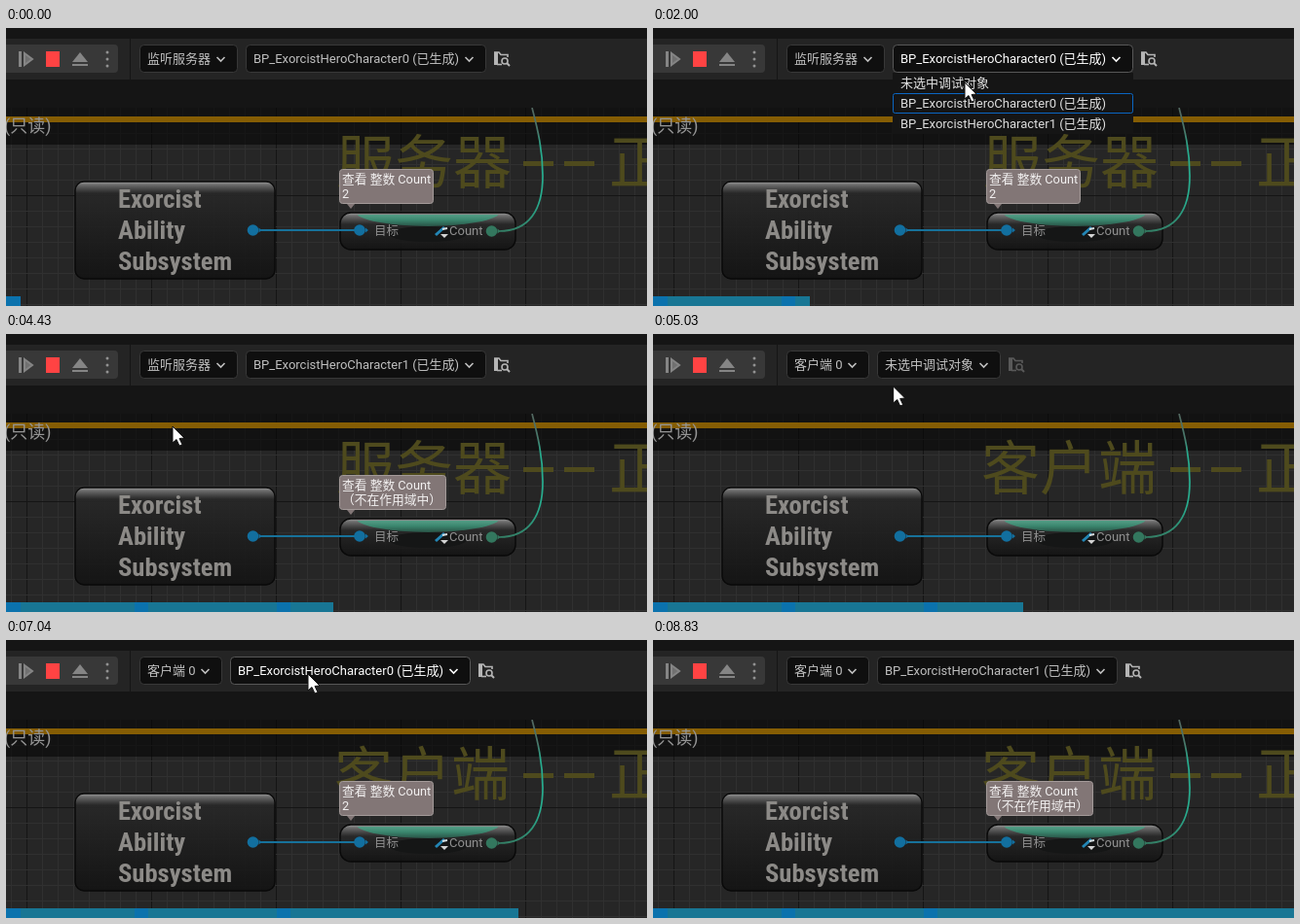
An HTML page with a canvas for the animation above (9.03 s loop, 658 by 286 pixels).

```html
<!DOCTYPE html>
<html lang="zh-CN">
<head>
<meta charset="utf-8">
<title>Blueprint debug target</title>
<style>
html, body { margin: 0; width: 100%; height: 100%; overflow: hidden; background: #151515; }
canvas { display: block; }
</style>
</head>
<body>
<canvas id="stage" width="658" height="286"></canvas>
<script>
const W = 658, H = 286, LOOP = 9030, STEPS = 45;
const ctx = document.getElementById('stage').getContext('2d');
const SANS = 'Roboto, "Noto Sans CJK SC", "Noto Sans CJK", sans-serif';
const CJK = '"Noto Sans CJK SC", "Noto Sans CJK", sans-serif';
const UI = '13px ' + SANS;

const NONE = '未选中调试对象';
const HERO = n => `BP_ExorcistHeroCharacter${n} (已生成)`;
const TARGETS = [NONE, HERO(0), HERO(1)];
const WORLDS = ['所有世界', '监听服务器', '客户端 0'];

// Cursor path: step, x, y of the tip
const PATH = [
  [2, 576, 150], [5, 400, 34], [7, 372, 34], [10, 320, 56], [11, 322, 96], [13, 318, 98],
  [17, 232, 40], [18, 222, 31], [19, 220, 34], [21, 170, 96], [23, 172, 94],
  [26, 284, 34], [28, 288, 36], [30, 291, 73], [32, 296, 78], [34, 310, 36],
  [36, 310, 34], [38, 312, 96], [40, 316, 98], [42, 520, 290]
];

function rect(x, y, w, h, color) {
  ctx.fillStyle = color;
  ctx.fillRect(x, y, w, h);
}

function box(x, y, w, h, r, fill, stroke, line = 1) {
  ctx.beginPath();
  ctx.roundRect(x, y, w, h, r);
  if (fill) { ctx.fillStyle = fill; ctx.fill(); }
  if (stroke) { ctx.strokeStyle = stroke; ctx.lineWidth = line; ctx.stroke(); }
}

function poly(points, fill, stroke, line = 1, close = true) {
  ctx.beginPath();
  points.forEach(([x, y]) => ctx.lineTo(x, y));
  if (close) ctx.closePath();
  if (fill) { ctx.fillStyle = fill; ctx.fill(); }
  if (stroke) { ctx.strokeStyle = stroke; ctx.lineWidth = line; ctx.stroke(); }
}

function dot(x, y, r, color) {
  ctx.beginPath();
  ctx.arc(x, y, r, 0, Math.PI * 2);
  ctx.fillStyle = color;
  ctx.fill();
}

function label(text, x, y, color, font = UI) {
  ctx.font = font;
  ctx.fillStyle = color;
  ctx.fillText(text, x, y);
}

function textWidth(text) {
  ctx.font = UI;
  return ctx.measureText(text).width;
}

function vertical(y0, y1, ...stops) {
  const g = ctx.createLinearGradient(0, y0, 0, y1);
  stops.forEach(([at, color]) => g.addColorStop(at, color));
  return g;
}

function stepAt(t) {
  return Math.min(STEPS - 1, Math.floor((t < 3400 ? t : t - 30) / 200));
}

function stateAt(i) {
  const client = i >= 23;
  const target = i < 12 ? 1 : i < 23 ? 2 : i < 31 ? 0 : i < 40 ? 1 : 2;
  let menu = null;
  if (i >= 7 && i <= 11) menu = { kind: 'target', hover: i === 11 ? 2 : -1 };
  if (i >= 19 && i <= 21) menu = { kind: 'world', hover: i - 19 };
  if (i >= 28 && i <= 30) menu = { kind: 'target', hover: i === 30 ? 1 : i === 29 ? 0 : -1 };
  if (i >= 36 && i <= 39) menu = { kind: 'target', hover: i > 37 ? 2 : i === 37 ? 1 : -1 };
  return { client, target, menu, cursor: cursorAt(i) };
}

function cursorAt(i) {
  const next = PATH.findIndex(k => k[0] > i);
  if (next < 1) return null;
  const [a, x0, y0] = PATH[next - 1], [b, x1, y1] = PATH[next];
  const u = (i - a) / (b - a);
  return [x0 + (x1 - x0) * u, y0 + (y1 - y0) * u];
}

function grid() {
  rect(0, 82, W, H - 82, '#262626');
  for (let x = 5; x < W; x += 16) rect(x, 82, 1, H, (x - 21) % 128 ? '#303030' : '#151515');
  for (let y = 92; y < H; y += 16) rect(0, y, W, 1, (y - 172) % 128 ? '#303030' : '#151515');
}

function watermark(client) {
  const color = '#4e4a1d', font = '500 60px ' + CJK;
  label(client ? '客户端' : '服务器', client ? 337 : 339, 160, color, font);
  rect(531, 137, 31, 5, color);
  rect(573, 137, 31, 5, color);
  label('正', 619, 160, color, font);
}

function header() {
  rect(0, 82, W, 38, 'rgba(8,8,8,.62)');
  rect(0, 91, W, 6, '#855d04');
  label('(只读)', -2, 107, '#959595', '18px ' + SANS);
}

function wires() {
  ctx.lineWidth = 2;
  ctx.strokeStyle = '#17729b';
  ctx.beginPath();
  ctx.moveTo(260, 208);
  ctx.lineTo(362, 208);
  ctx.stroke();
  ctx.strokeStyle = vertical(82, 210, [0, '#52665f'], [.2, '#48796b'], [.32, '#27ac8e'], [.75, '#27ac8e'], [1, '#347e65']);
  ctx.lineWidth = 1.7;
  ctx.beginPath();
  ctx.moveTo(506, 209);
  ctx.bezierCurveTo(537, 209, 551, 187, 551, 152);
  ctx.bezierCurveTo(551, 126, 546, 105, 540, 82);
  ctx.stroke();
}

function pin(x, y, color) {
  dot(x, y, 5.8, color);
  poly([[x + 6, y - 2.5], [x + 9, y], [x + 6, y + 2.5]], color);
}

function nodeBody(x, y, w, h, r) {
  const shine = 12 / h;
  const fill = vertical(y, y + h, [0, '#9a9a9a'], [shine * .3, '#696969'], [shine, 'rgba(40,40,40,.9)'], [1, 'rgba(18,18,18,.88)']);
  box(x, y, w, h, r, fill, '#090909', 1.4);
}

function getterNode() {
  nodeBody(71, 158, 205, 100, 9);
  const font = '700 26.6px "Roboto Condensed", ' + SANS;
  ctx.fontStretch = 'condensed';
  ['Exorcist', 'Ability', 'Subsystem'].forEach((word, n) => label(word, 115, 185 + n * 32, '#8c8a87', font));
  ctx.fontStretch = 'normal';
}

function countNode() {
  nodeBody(343, 190, 180, 38, 11);
  ctx.save();
  ctx.beginPath();
  ctx.roundRect(344, 192, 178, 35, 10);
  ctx.clip();
  ctx.beginPath();
  ctx.ellipse(433, 189, 74, 15, 0, 0, Math.PI * 2);
  ctx.fillStyle = vertical(191, 204, [0, '#59a38b'], [.5, '#3b866e'], [1, '#285446']);
  ctx.fill();
  ctx.beginPath();
  ctx.ellipse(433, 212, 40, 8, 0, 0, Math.PI * 2);
  ctx.fillStyle = '#151616';
  ctx.fill();
  ctx.restore();
  label('目标', 378, 213, '#909090', '12.5px ' + SANS);
  label('Count', 455, 213, '#909090');
  poly([[441, 213], [450, 205]], null, '#2386b5', 3, false);
  poly([[448, 207], [453, 206]], null, '#d6dfe2', 2, false);
  poly([[446, 212], [454, 212], [450, 216]], '#d4d4d4');
}

function bubble(target) {
  if (!target) return;
  const width = target === 1 ? 97 : 110, font = '12.75px ' + SANS;
  box(342.5, 145.5, width - 1, 35, 3, '#827676', '#a39a99');
  poly([[350, 181], [358, 181], [354, 186]], '#827676');
  label('查看 整数 Count', 345, 160, '#f2f0f0', font);
  label(target === 1 ? '2' : '（不在作用域中）', 345, 175, '#f2f0f0', font);
}

function toolbar() {
  rect(0, 0, W, 82, '#151515');
  rect(0, 11, W, 42, '#242424');
  box(-8, 17, 123, 29, 4, '#383838');
  rect(127, 11, 1, 42, '#151515');
  rect(13, 24, 3, 16, '#858585');
  poly([[19, 26], [27, 32], [19, 38]], '#707070', '#858585', 2);
  rect(41, 24, 14, 16, '#ff4343');
  poly([[68, 35], [76, 25], [84, 35]], '#858585');
  rect(68, 37, 16, 2, '#858585');
  [25, 32, 39].forEach(y => dot(104, y, 1.5, '#929292'));
}

function comboWidth(text) {
  return Math.floor(textWidth(text) + 36);
}

function combo(text, x, active) {
  const w = comboWidth(text);
  const color = active ? '#fff' : '#c0c0c0';
  box(x + .5, 17.5, w - 1, 28, 4, '#0f0f0f', active ? '#575757' : '#383838');
  label(text, x + 8, 36, color);
  const c = x + w - 17.5;
  poly([[c - 4, 30], [c, 34], [c + 4, 30]], null, color, 1.6, false);
}

function browseIcon(x, color) {
  poly([[x, 25], [x + 5, 25], [x + 7, 27.5], [x + 14, 27.5], [x + 14, 30]], null, color, 1.6, false);
  poly([[x, 25], [x + 4, 25], [x + 4, 38], [x, 38]], color);
  poly([[x + 3, 37.5], [x + 8, 37.5]], null, color, 1.6, false);
  ctx.beginPath();
  ctx.arc(x + 11, 34, 3, 0, Math.PI * 2);
  ctx.stroke();
  poly([[x + 13, 36], [x + 16, 39]], null, color, 2, false);
}

function dropdown(items, x, buttonWidth, selected, hover) {
  const w = Math.max(buttonWidth, Math.floor(Math.max(...items.map(textWidth)) + 16));
  rect(x, 46, w, items.length * 21, '#151515');
  items.forEach((item, n) => {
    const y = 46 + n * 21;
    if (n === hover) rect(x, y, w, 21, '#0070e0');
    else if (n === selected) box(x + .5, y + .5, w - 1, 20, 2, null, '#0a66c2');
    label(item, x + 8, y + 15, n === hover ? '#fff' : '#dedede');
  });
}

function controls({ client, target, menu, cursor }) {
  const over = (x, w) => cursor && cursor[1] >= 17 && cursor[1] < 46 && cursor[0] >= x && cursor[0] < x + w;
  const justOpened = kind => menu && menu.kind === kind && menu.hover < 0;
  const world = WORLDS[client ? 2 : 1], name = TARGETS[target];
  const worldWidth = comboWidth(world), targetWidth = comboWidth(name);
  const targetX = 137 + worldWidth + 8;
  combo(world, 137, justOpened('world') || over(137, worldWidth));
  combo(name, targetX, justOpened('target') || over(targetX, targetWidth));
  browseIcon(targetX + targetWidth + 8, target ? '#b5b5b5' : '#595959');
  if (!menu) return;
  if (menu.kind === 'world') dropdown(WORLDS, 137, worldWidth, 1, menu.hover);
  else dropdown(TARGETS, targetX, targetWidth, target, menu.hover);
}

function progress(i) {
  const edge = n => Math.round(W * n / STEPS);
  rect(0, 276, edge(i + 1), 10, '#187694');
  [0, 9, 19].filter(n => n <= i).forEach(n => rect(edge(n), 276, edge(n + 1) - edge(n), 10, '#0b72ad'));
}

function pointer([x, y]) {
  const shape = [[0, 0], [0, 17], [4, 13.5], [7, 20], [10, 18.7], [7, 12.5], [12, 12]];
  poly(shape.map(([dx, dy]) => [x + dx, y + dy]), '#fff', '#111');
}

function draw(i) {
  const state = stateAt(i);
  grid();
  header();
  watermark(state.client);
  getterNode();
  countNode();
  wires();
  pin(253.5, 208, '#126f9f');
  pin(363, 208, '#126f9f');
  pin(498.5, 209, '#33775e');
  bubble(state.target);
  toolbar();
  controls(state);
  progress(i);
  if (state.cursor) pointer(state.cursor);
}

function tick() {
  draw(stepAt(performance.now() % LOOP));
  requestAnimationFrame(tick);
}
tick();
</script>
</body>
</html>
```
